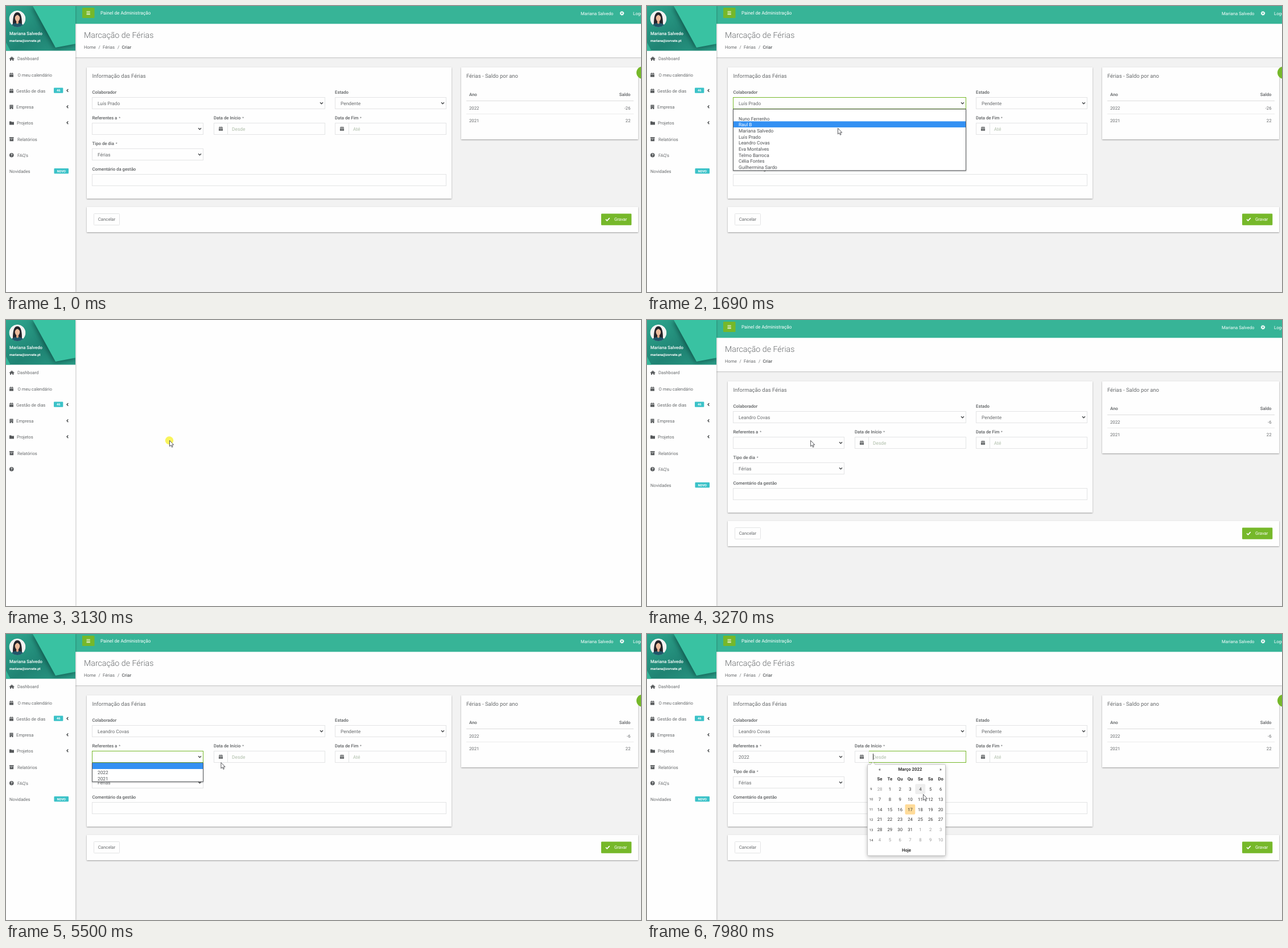
Animation of 1116x502 px, one loop 8 s. Source, as an HTML page:

```html
<!DOCTYPE html>
<html lang="pt">
<head>
<meta charset="utf-8">
<title>Marcação de Férias</title>
<style>
  html, body { margin: 0; width: 100%; height: 100%; overflow: hidden; background: #fefefe; }
  svg { display: block; width: 100vw; height: 100vh; }
  text { font: 400 7.75px Roboto, sans-serif; fill: #676a6c; white-space: pre; text-rendering: geometricPrecision; }
  .b { font-weight: 500; fill: #5c5f61; }
  .f { font-size: 8.35px; }
  .o { font-size: 8.27px; fill: #4c4f52; }
  .h { font-size: 9.45px; }
  .ph { fill: #aebda9; }
  .w { fill: #fff; }
  .panel { fill: #fefefe; filter: drop-shadow(0 1px 1px rgba(0,0,0,.36)); }
  .field { fill: #fefefe; stroke: #e3e4e5; }
  .field.on { stroke: #76b82a; }
  .chev { fill: none; stroke: #45484a; stroke-width: 1.4; }
  .ic { fill: #55585a; }
</style>
</head>
<body>
<svg id="stage" viewBox="0 0 1116 502" preserveAspectRatio="none"></svg>
<script>
const LOOP = 8000;
const USER = 'Mariana Salvedo';
const PEOPLE = ['', 'Nuno Ferrenho', 'Raul B', USER, 'Luís Prado', 'Leandro Covas',
  'Eva Montalves', 'Telmo Barroca', 'Célia Fontes', 'Guilhermina Sardo'];
const ROW = 10.7;

// Markup helpers
const text = (x, y, s, cls = '', more = '') => `<text x="${x}" y="${y}" class="${cls}" ${more}>${s}</text>`;
const rect = (x, y, w, h, more = '') => `<rect x="${x}" y="${y}" width="${w}" height="${h}" ${more}/>`;
const path = (d, more = '') => `<path d="${d}" ${more}/>`;
const group = (id, ...parts) => `<g id="${id}">${parts.join('')}</g>`;
const middle = 'text-anchor="middle"';
const right = 'text-anchor="end"';

const field = (x, y, w, id = '') => rect(x + .5, y + .5, w - 1, 20, `class="field" id="${id}"`);
const label = (x, y, s, starX) => text(x, y, s, 'b') + (starX ? text(starX, y, '*', '', 'style="font-size:6.5px"') : '');
const select = (x, y, w, value, id = '') => field(x, y, w, id) +
  text(x + 10, y + 13.6, value, 'f', `id="${id}Value"`) +
  path(`M${x + w - 9} ${y + 9.3}l2.5 2.5 2.5-2.5`, 'class="chev"');
const calendarIcon = (x, y) => path(`M${x} ${y + 1.5}h1.5v-1.5h1.2v1.5h1.7v-1.5h1.2v1.5h1.4v1.3h-7zM${x} ${y + 3.4}h7v4h-7z`, 'class="ic"');
const dateField = (x, y, w, hint, id) => field(x + 24, y, w - 24, id) + field(x, y, 25) +
  calendarIcon(x + 9, y + 6.5) +
  path(`M${x + 10.3} ${y + 11}h4.6m-4.6 1.7h4.6`, 'stroke="#fff" stroke-width=".7" stroke-dasharray="1 .8"') +
  text(x + 32, y + 13.6, hint, 'f ph');
const badge = (x, y, w, s) => rect(x, y, w, 9.3, 'rx="1" fill="#3bc2c8"') +
  text(x + w / 2, y + 6.7, s, 'w', middle + ' style="font-size:5.6px;font-weight:700"');
const menu = (id, x, y, w, items) => group(id,
  rect(x + .5, y, w - 1, items.length * ROW + .8, 'fill="#fff" stroke="#55585a" style="filter:drop-shadow(0 1px 1px rgba(0,0,0,.25))"'),
  rect(x + 1, y, w - 2, ROW, 'class="mark" fill="#3390f3"'),
  ...items.map((s, i) => text(x + 10, y + i * ROW + 8.8, s, 'o')));

function sidebar() {
  const items = [['Dashboard', 20, 95.2], ['O meu calendário', 20.5, 123.7], ['Gestão de dias', 18, 151.7],
    ['Empresa', 18, 180.2], ['Projetos', 19, 208.2], ['Relatórios', 20, 236.7]];
  return rect(0, 0, 122, 502, 'fill="#fefefe" style="filter:drop-shadow(1px 0 1px rgba(0,0,0,.22))"') +
    rect(0, 0, 122, 78.5, 'fill="url(#teal)"') +
    `<g clip-path="url(#head)">` +
    path('M47 0H124V66L87 73Z', 'fill="#39c2a2" style="filter:drop-shadow(-2px 2px 4px rgba(0,40,35,.5))"') +
    path('M0 64L8 79H0Z', 'fill="#35b598"') + '</g>' +
    `<g clip-path="url(#face)"><circle cx="20" cy="22.5" r="14.5" fill="#f3f3f1"/>` +
    path('M12 33C12 22 13 11 20 11S28 22 28 33Z', 'fill="#26252b"') +
    path('M8 38C9 31 15 30 20 30S31 31 32 38Z', 'fill="#20566a"') +
    path('M18 25h4v5q-2 3-4 0z', 'fill="#dba283"') +
    '<ellipse cx="20" cy="21" rx="4.3" ry="6" fill="#edbb9c"/>' +
    path('M15.3 21Q15 14 20 13.5Q25 14 24.7 21Q24 17 20 15.5Q16 17 15.3 21Z', 'fill="#26252b"') + '</g>' +
    text(6, 51.3, USER, 'w', 'style="font-weight:500"') +
    text(6, 63.2, 'mariana@zorvate.pt', 'w', 'style="font-size:6px;font-weight:600"') +
    items.map(([s, x, y]) => text(x, y, s)).join('') +
    path('M5.7 92.6l4.5-3.9 4.5 3.9-.6.6-3.9-3.3-3.9 3.3zM7 92.8l3.2-2.6 3.2 2.6v3.1h-2.2v-2h-2v2H7z', 'class="ic"') +
    calendarIcon(6, 117) + calendarIcon(6, 145) +
    path('M6.5 173.5h6v7.5h-2.3v-2H8.8v2H6.5z', 'class="ic"') +
    path('M8 175h3m-3 2h3', 'stroke="#fff" stroke-width=".8" stroke-dasharray="1"') +
    path('M6 202.5h3l1 1h4v5H6z', 'class="ic"') +
    path('M6 230.3h7.6v2H6zM6.5 232.8h6.6v4.5H6.5z', 'class="ic"') + path('M8.5 234h2.6', 'stroke="#fff" stroke-width=".7"') +
    '<circle cx="9.8" cy="261.8" r="3.8" class="ic"/>' +
    text(9.8, 264.2, '?', 'w', middle + ' style="font-size:6.5px;font-weight:700"') +
    badge(84, 143.4, 16.3, '46') +
    [148.3, 176.8, 204.8].map(y => path(`M109.3 ${y - 2.4}l-2.3 2.4 2.3 2.4`, 'class="chev" stroke-width="1.1"')).join('') +
    group('late', text(20, 264.7, "FAQ's"), text(6, 293.4, 'Novidades'), badge(84.5, 284.9, 25.5, 'NOVO'));
}

function topbar() {
  return rect(122, 31, 994, 59, 'class="panel" style="filter:drop-shadow(0 1px 1px rgba(0,0,0,.2))"') +
    rect(122, 0, 994, 31.3, 'fill="#37b497"') +
    rect(134, 3, 21.5, 18, 'rx="1" fill="#76b82a"') +
    path('M141.5 9.8h6.3m-6.3 2.4h6.3m-6.3 2.4h6.3', 'stroke="#fff" stroke-width="1.1"') +
    text(166, 14.5, 'Painel de Administração', 'w', 'style="font-size:8.2px"') +
    text(1010, 15.6, USER, 'w') + text(1102, 15.6, 'Logout', 'w') +
    '<g fill="none" stroke="#fff"><circle cx="1082.5" cy="12.8" r="2.1" stroke-width="1.6"/>' +
    '<circle cx="1082.5" cy="12.8" r="3.2" stroke-width="1.3" stroke-dasharray="1.4 1.113"/></g>' +
    text(137, 56.4, 'Marcação de Férias', '', 'style="font-size:14.2px;font-weight:300"') +
    text(137, 74.6, 'Home') + text(162.5, 74.6, '/') + text(170, 74.6, 'Férias') + text(196, 74.6, '/') +
    text(203.5, 74.6, 'Criar', 'b');
}

function form() {
  return rect(142, 107.5, 641, 230.5, 'class="panel"') +
    text(151.5, 125.5, 'Informação das Férias', 'h') +
    label(151.5, 154.2, 'Colaborador') + select(151, 160, 410, PEOPLE[4], 'who') +
    label(578, 154.2, 'Estado') + select(578, 160, 196, 'Pendente') +
    label(151.5, 198.8, 'Referentes a', 198.3) + select(151, 205, 196, '', 'year') +
    label(365, 198.8, 'Data de Início', 415.3) + dateField(365, 205, 196, 'Desde', 'start') +
    label(578, 198.8, 'Data de Fim', 622) + dateField(578, 205, 196, 'Até', 'end') +
    label(151.5, 244.4, 'Tipo de dia', 192.8) + select(151, 250, 196, 'Férias') +
    label(151.5, 289.2, 'Comentário da gestão') + field(151, 295, 623) +
    rect(142, 352.5, 969, 44.5, 'class="panel"') +
    rect(154.5, 364.5, 45, 20, 'rx="1" class="field"') + text(177, 377.3, 'Cancelar', '', middle) +
    rect(1046, 364.5, 53.3, 20.3, 'rx="1.2" fill="#76b82a"') +
    path('M1054 374.5l2.3 2.3 4.5-4.7', 'fill="none" stroke="#fff" stroke-width="1.6"') +
    text(1069, 377.3, 'Gravar', 'w');
}

function balance() {
  return rect(800, 107.5, 311, 126.5, 'class="panel"') +
    text(809, 125.5, 'Férias - Saldo por ano', 'h') +
    text(814, 158.4, 'Ano', 'b') + text(1097.5, 158.4, 'Saldo', 'b', right) +
    path('M809 166.5h294', 'stroke="#dcdcdc"') + path('M809 189.5h294', 'stroke="#ebebeb"') +
    text(814, 181.6, '2022') + text(1097.5, 181.6, '-26', '', right + ' id="left"') +
    text(814, 204.2, '2021') + text(1097.5, 204.2, '22', '', right);
}

function calendar() {
  const colX = c => 409 + c * 17.85, rowY = r => 274.8 + r * 17.85;
  const dark = 'style="fill:#333"', faint = 'style="fill:#999"';
  let days = '';
  for (let r = 0; r < 6; r++) {
    days += text(394, rowY(r) - .5, 9 + r, '', middle + ' style="font-size:5.8px;fill:#333"');
    for (let c = 0; c < 7; c++) {
      const n = r * 7 + c;
      const day = n < 1 ? 28 : n > 31 ? n - 31 : n;
      days += text(colX(c), rowY(r), day, '', `${middle} ${n < 1 || n > 31 ? faint : dark}`);
    }
  }
  const bold = (x, y, s) => text(x, y, s, '', middle + ' style="fill:#333;font-weight:700"');
  return group('calendar',
    path('M387.5 230.5q0-1.5 1.5-1.5h4l4-4 4 4h122q1.5 0 1.5 1.5v157q0 1.5-1.5 1.5h-134q-1.5 0-1.5-1.5z',
      'fill="#fff" stroke="#c4c4c4" style="filter:drop-shadow(0 2px 3px rgba(0,0,0,.25))"'),
    rect(471.4, 263.3, 17.8, 17.8, 'id="hover" rx="2" fill="#eee"'),
    rect(453.5, 299, 17.8, 17.8, 'rx="2" fill="#ffdb99"'),
    bold(409, 239.5, '«'), bold(462.5, 239.5, 'Março 2022'), bold(516, 239.5, '»'),
    ...['Se', 'Te', 'Qu', 'Qu', 'Se', 'Sa', 'Do'].map((s, i) => bold(colX(i), 257, s)),
    days, bold(456, 381.8, 'Hoje'));
}

const stage = document.getElementById('stage');
stage.innerHTML = `<defs>
  <linearGradient id="teal" x2="1" y2="1"><stop stop-color="#2fa78f"/><stop offset=".55" stop-color="#1f8373"/><stop offset="1" stop-color="#2a9b86"/></linearGradient>
  <clipPath id="head">${rect(0, 0, 122, 78.5)}</clipPath>
  <clipPath id="face"><circle cx="20" cy="22.5" r="14.5"/></clipPath></defs>` +
  group('page', rect(122, 0, 994, 502, 'fill="#f2f2f2"'), topbar(), form(), balance(),
    '<circle id="bubble" cx="1119" cy="117" r="11" fill="#76b82a"/>',
    menu('people', 151, 181, 410, PEOPLE), menu('years', 151, 226.3, 196, ['', '2022', '2021']),
    path('M397.5 210v11', 'id="caret" stroke="#333"'), calendar()) +
  sidebar() +
  '<circle id="glow" cx="287" cy="211.5" r="7.2" fill="#f9f45c"/>' +
  path('M0 0V10.3L2.4 8.2L4 11.8L5.6 11.1L4.1 7.6H7.2Z', 'id="cursor" fill="#fff" stroke="#44464a" stroke-width=".9"');

// Timelines: [ms, value], held until the next entry
const track = {
  focus: [[0, ''], [1250, 'who'], [2990, ''], [3730, 'year'], [6900, 'start']],
  people: [[0, -1], [1250, 4], [1440, 1], [1600, 2], [1760, 3], [2000, 4], [2200, 5], [2480, -1]],
  years: [[0, -1], [3800, 0], [4000, 1], [5050, 0], [5800, 1], [6380, -1]],
  page: [[0, 1], [2990, 0], [3270, 1]],
  bubble: [[0, 1], [2990, 0], [3540, 1]],
  glow: [[0, 0], [3060, 1], [3270, 0]],
  calendar: [[0, 0], [6920, 1]],
  caret: [[0, 0], [6920, 1], [7450, 0], [7950, 1]],
  hover: [[0, 0], [7900, 1]],
  whoValue: [[0, PEOPLE[4]], [2580, PEOPLE[5]]],
  yearValue: [[0, ''], [6380, '2022']],
  left: [[0, '-26'], [2990, '-6']]
};
const moves = [[0, 1031, 515], [130, 1031, 515], [400, 800, 390], [650, 430, 235], [870, 295, 185],
  [1200, 328, 171], [1350, 330, 176], [1500, 334, 196], [1690, 335.5, 214.5], [2200, 334, 235], [2440, 332.5, 237],
  [2780, 332.5, 237], [3060, 287.5, 211.5], [3270, 287.5, 211.5], [3540, 314, 212], [3730, 316, 214],
  [4140, 317.5, 245], [4880, 317.5, 245], [5080, 345, 231], [5330, 427, 219], [5640, 338, 231],
  [5970, 305, 238], [6120, 302, 237], [6240, 314, 238], [6380, 314, 238], [6580, 329, 238],
  [6880, 450, 213], [7050, 462, 208], [7590, 462, 208], [7780, 498, 245], [7980, 485.5, 281.5]];

const el = id => document.getElementById(id);
const at = (name, t) => track[name].filter(([ms]) => ms <= t).pop()[1];
const show = (id, on) => { el(id).style.display = on ? '' : 'none'; };

function showMenu(id, index) {
  const box = el(id);
  show(id, index >= 0);
  if (index < 0) return;
  const mark = box.querySelector('.mark');
  mark.setAttribute('y', +box.firstChild.getAttribute('y') + index * ROW);
  box.querySelectorAll('text').forEach((s, i) => { s.style.fill = i === index ? '#fff' : ''; });
}

function cursorAt(t) {
  const i = moves.findIndex(([ms]) => ms > t);
  if (i < 0) return moves[moves.length - 1].slice(1);
  const [t0, x0, y0] = moves[i - 1], [t1, x1, y1] = moves[i];
  const k = (t - t0) / (t1 - t0);
  return [x0 + (x1 - x0) * k, y0 + (y1 - y0) * k];
}

function render(t) {
  for (const id of ['page', 'bubble', 'glow', 'calendar', 'caret', 'hover']) show(id, at(id, t));
  show('late', at('page', t));
  for (const id of ['whoValue', 'yearValue', 'left']) el(id).textContent = at(id, t);
  for (const id of ['who', 'year', 'start']) el(id).classList.toggle('on', at('focus', t) === id);
  for (const id of ['people', 'years']) showMenu(id, at(id, t));
  el('cursor').setAttribute('transform', `translate(${cursorAt(t)})`);
}

const begin = performance.now();
function loop() {
  render((performance.now() - begin) % LOOP);
  requestAnimationFrame(loop);
}
loop();
</script>
</body>
</html>
```
